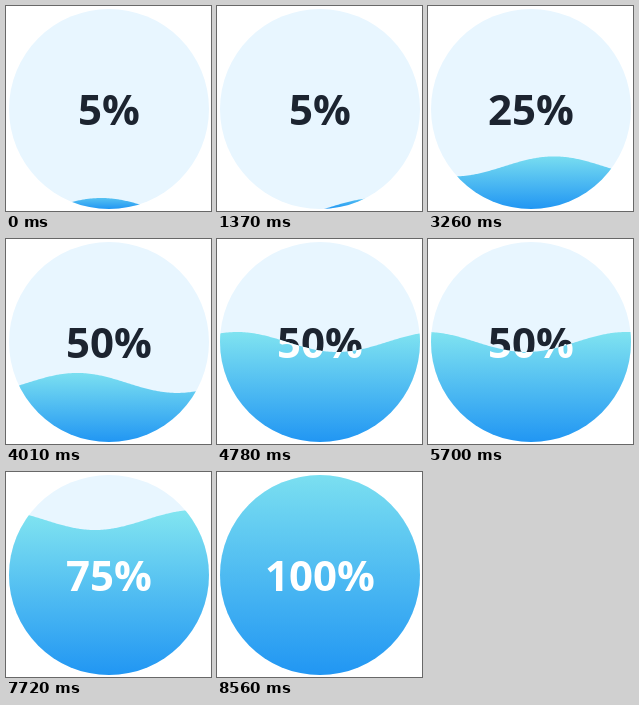
These frames come from a looping animation (205x205 px, 9.16 s). An HTML page with a canvas:

```html
<!DOCTYPE html>
<html>
<head>
<meta charset="utf-8">
<title>Liquid gauge</title>
<style>
  html, body { margin: 0; width: 100%; height: 100%; overflow: hidden; background: #fff; }
  canvas { display: block; }
</style>
</head>
<body>
<canvas id="gauge" width="205" height="205"></canvas>
<script>
const ctx = document.getElementById('gauge').getContext('2d');
const LOOP = 9160, RISE = 800;
const C = 103, R = 100, BOTTOM = C + R;
const AMP = 10, WAVELENGTH = 200, SPEED = 0.1935, START = 95;

// [time in ms, percent]
const steps = [[0, 5], [1725, 20], [2725, 25], [3725, 50], [5725, 75], [7725, 100]];

const ease = u => u < 0.5 ? 2 * u * u : 1 - 2 * (1 - u) ** 2;

function valuesAt(t) {
  let i = steps.length - 1;
  while (steps[i][0] > t) i--;
  const [begin, percent] = steps[i];
  const from = i ? steps[i - 1][1] : percent;
  const u = Math.min(1, (t - begin) / RISE);
  return { percent, fill: from + (percent - from) * ease(u) };
}

// At 0 % the crests lie below the circle, at 100 % the troughs lie above it.
const levelOf = fill => BOTTOM + AMP - (2 * R + 2 * AMP) * fill / 100;

function waterPath(level, crest) {
  const path = new Path2D();
  path.moveTo(0, 220);
  for (let x = 0; x <= 206; x++) {
    path.lineTo(x, level - AMP * Math.cos(2 * Math.PI * (x - crest) / WAVELENGTH));
  }
  path.lineTo(206, 220);
  path.closePath();
  return path;
}

function label(percent, color) {
  ctx.fillStyle = color;
  ctx.fillText(percent + '%', C, 119);
}

const disc = new Path2D();
disc.arc(C, C, R, 0, 2 * Math.PI);

function draw(t) {
  const { percent, fill } = valuesAt(t);
  const level = levelOf(fill);
  const water = waterPath(level, START + SPEED * t);

  ctx.clearRect(0, 0, 205, 205);
  ctx.font = '700 42px "Open Sans", "Noto Sans", sans-serif';
  ctx.textAlign = 'center';
  ctx.fillStyle = '#e8f6ff';
  ctx.fill(disc);
  label(percent, '#1c2430');

  const shade = ctx.createLinearGradient(0, level - 2 * AMP, 0, BOTTOM);
  shade.addColorStop(0, '#88eaf0');
  shade.addColorStop(1, '#2196f3');
  ctx.save();
  ctx.clip(water);
  ctx.fillStyle = shade;
  ctx.fill(disc);
  label(percent, '#fff');
  ctx.restore();
}

const t0 = performance.now();
function tick() {
  draw((performance.now() - t0) % LOOP);
  requestAnimationFrame(tick);
}
tick();
</script>
</body>
</html>
```
